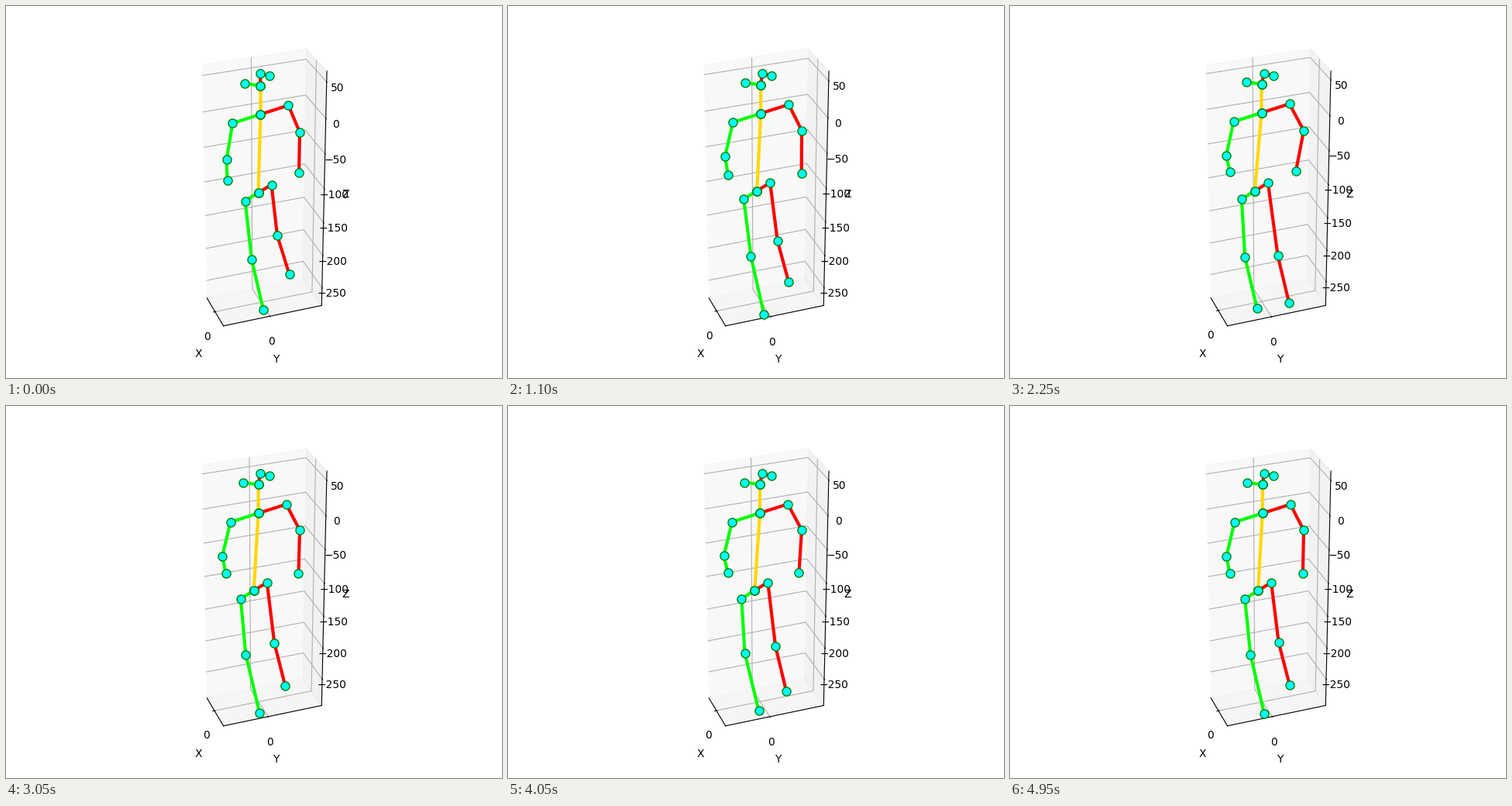
A matplotlib script that plays this animation: 640 by 480 pixels, repeating every 5000 ms.

```python
import numpy as np
import matplotlib.pyplot as plt
from matplotlib.animation import FuncAnimation

FRAMES, INTERVAL = 100, 50
STRIDE = 0.955                    # seconds per gait cycle

HIP_HALF = np.array([17, -10.5])  # from the middle to the left side
SHOULDER_HALF = np.array([36, -11.5])
NECK = np.array([0, -37])
RIGHT_EAR = np.array([-20, -2.5])

LIMBS = [
    ("lime", "hip r_hip r_knee r_ankle"),
    ("red", "hip l_hip l_knee l_ankle"),
    ("gold", "hip chest nose"),
    ("lime", "chest r_sho r_elbow r_wrist"),
    ("red", "chest l_sho l_elbow l_wrist"),
    ("red", "nose l_eye l_ear"),
    ("lime", "nose r_ear"),
]


def smooth(u):
    u = np.clip(u, 0, 1)
    return u * u * (3 - 2 * u)


def wave(a, mid, cos, sin, bend=(0, 0)):
    """Point circling mid once per stride; bend adds a twice-per-stride flex."""
    mid, cos, sin, bend = map(np.array, (mid, cos, sin, bend))
    return mid + cos * np.cos(a) + sin * np.sin(a) + bend * np.cos(2 * a)


def sway(a):
    return np.cos(a - 0.85 * 2 * np.pi)


def pose(a):
    """Joint positions in stage pixels at gait angle a."""
    hip = wave(a, (321, 241), (4.5, 0), (-3, -3))
    chest = np.array([327, 139]) + np.array([2.5, 1.2]) * sway(a)
    nose = chest + NECK
    return {
        "hip": hip, "l_hip": hip + HIP_HALF, "r_hip": hip - HIP_HALF,
        "chest": chest, "l_sho": chest + SHOULDER_HALF, "r_sho": chest - SHOULDER_HALF,
        "nose": nose, "r_ear": nose + RIGHT_EAR,
        "l_eye": (328, 87), "l_ear": (340, 90),
        "l_elbow": wave(a, (379, 163), (0, 0), (0, -3)),
        "l_wrist": wave(a, (370, 212), (8, 2.5), (5, 3)),
        "r_elbow": wave(a, (283.5, 197), (1, 1), (-5, -4)),
        "r_wrist": wave(a, (285.5, 222), (0, 3), (-2, -7.5)),
        "l_knee": wave(a, (344.5, 308), (2, -16), (4, 7), (3.5, 4)),
        "l_ankle": wave(a, (360, 370.5), (2, -22.5), (2.5, -3), (3.5, -2)),
        "r_knee": wave(a, (299, 318), (9, 0), (15, 10), (9, 9)),
        "r_ankle": wave(a, (316, 376), (10, 7), (13, 26), (6, 9)),
    }


def fit_axes(t, a, chest):
    """Keep the origin of the axes at the chest while the floor drops slowly."""
    x0 = 0.48 + 0.03 * sway(a)
    y0 = 0.459 + 0.0063 * (chest[0] - 327)
    top = 63.5 + 1.2 * (chest[1] - 139)
    floor = -278 - 15 * smooth((t - 1) / 2)
    ax.set_xlim(-x0, 1 - x0)
    ax.set_ylim(-y0, 1 - y0)
    ax.set_zlim(floor, top)


fig = plt.figure(figsize=(6.4, 4.8), dpi=100)
ax = fig.add_subplot(111, projection="3d")
ax.set_box_aspect((1, 2, 5))
ax.view_init(elev=30, azim=-20)
ax.set(xlabel="X", ylabel="Y", zlabel="Z",
       xticks=[0], yticks=[0], zticks=range(-250, 51, 50))

# Pixel overlay for the skeleton
stage = fig.add_axes([0, 0, 1, 1])
stage.set_xlim(0, 640)
stage.set_ylim(480, 0)
stage.axis("off")
lines = [stage.plot([], [], "o-", color=color, lw=3, ms=8,
                    mfc="cyan", mec="green")[0] for color, _ in LIMBS]


def update(n):
    t = n * INTERVAL / 1000
    a = 2 * np.pi * t / STRIDE
    joints = pose(a)
    fit_axes(t, a, joints["chest"])
    for line, (_, names) in zip(lines, LIMBS):
        line.set_data(*np.array([joints[j] for j in names.split()]).T)
    return lines


anim = FuncAnimation(fig, update, frames=FRAMES, interval=INTERVAL,
                     init_func=lambda: update(0), repeat=True, repeat_delay=0)
plt.show()
```
